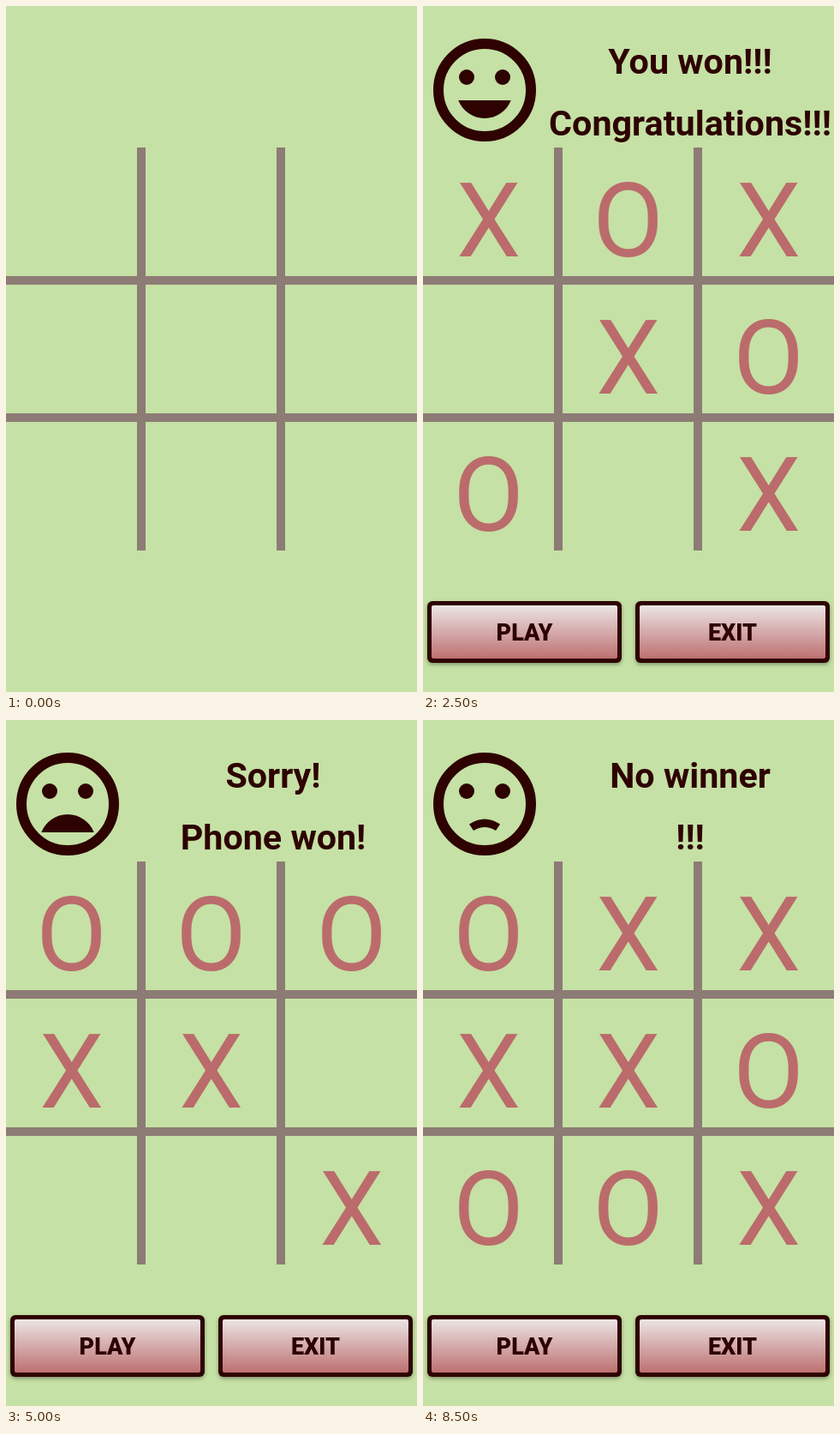
Recreate the animation shown at these times as an HTML page with a canvas. Size 480x800 px, loop 9000 ms.

```html
<!DOCTYPE html>
<html lang="en">
<head>
<meta charset="utf-8">
<title>Noughts and crosses</title>
<style>
html, body { margin: 0; width: 100%; height: 100%; overflow: hidden; background: #c5e1a5; }
canvas { display: block; }
</style>
</head>
<body>
<canvas id="stage" width="480" height="800"></canvas>
<script>
const ctx = document.getElementById('stage').getContext('2d');
const STEP = 500;
const GREEN = '#c5e1a5', LINE = '#8d7b75', MARK = '#bb6b6b', DARK = '#2e0201';
const COLUMNS = [76.5, 239.5, 403.5];

// Cells in order of play, X first; each step adds one X and the O that answers it.
const games = [
  { moves: '2586014', face: 'happy', lines: ['You won!!!', 'Congratulations!!!'] },
  { moves: '814032', face: 'sad', lines: ['Sorry!', 'Phone won!'] },
  { moves: '204635178', face: 'unsure', lines: ['No winner', '!!!'] }
];
for (const game of games) game.steps = Math.ceil(game.moves.length / 2) + 2;
const total = games.reduce((sum, game) => sum + game.steps, 0);

const mouths = {
  happy: new Path2D('M72 131C86 131 97.9 122.2 102.7 110H41.3C46.1 122.2 58 131 72 131Z'),
  sad: new Path2D('M72 110C58 110 46.1 118.7 41.3 131H102.7C97.9 118.7 86 110 72 110Z'),
  unsure: new Path2D('M54 121.5Q72 109.5 90 121.5L85 129Q72 121 59 129Z')
};

function text(str, x, y, font, color) {
  ctx.font = font + ' Roboto, sans-serif';
  ctx.textAlign = 'center';
  ctx.fillStyle = color;
  ctx.fillText(str, x, y);
}

function disc(x, y, r) {
  ctx.beginPath();
  ctx.arc(x, y, r, 0, Math.PI * 2);
}

function drawGrid() {
  ctx.fillStyle = LINE;
  for (const x of [153, 316]) ctx.fillRect(x, 165, 10, 470);
  for (const y of [315, 475]) ctx.fillRect(0, y, 480, 10);
}

function drawMarks(moves) {
  [...moves].forEach((cell, i) => {
    const row = Math.floor(cell / 3);
    text(i % 2 ? 'O' : 'X', COLUMNS[cell % 3], 292 + row * 160, '120px', MARK);
  });
}

function drawFace(mood) {
  disc(72, 98, 54);
  ctx.lineWidth = 12;
  ctx.strokeStyle = DARK;
  ctx.stroke();
  ctx.fillStyle = DARK;
  for (const x of [51, 93]) {
    disc(x, 83, 9);
    ctx.fill();
  }
  ctx.fill(mouths[mood]);
}

function drawButton(x, label) {
  ctx.save();
  ctx.shadowColor = 'rgba(0, 0, 0, 0.35)';
  ctx.shadowBlur = 4;
  ctx.shadowOffsetY = 2;
  ctx.fillStyle = DARK;
  ctx.beginPath();
  ctx.roundRect(x, 694, 227, 72, 6);
  ctx.fill();
  ctx.restore();

  const fade = ctx.createLinearGradient(0, 696, 0, 764);
  fade.addColorStop(0, '#eeeaea');
  fade.addColorStop(1, MARK);
  ctx.fillStyle = fade;
  ctx.beginPath();
  ctx.roundRect(x + 5, 699, 217, 62, 2);
  ctx.fill();
  text(label, x + 113.5, 740, '900 27px', DARK);
}

function drawResult(game) {
  drawFace(game.face);
  game.lines.forEach((line, i) => text(line, 312, 78.5 + i * 72, 'bold 41.25px', DARK));
  drawButton(5, 'PLAY');
  drawButton(248, 'EXIT');
}

function draw(time) {
  let step = Math.floor(time / STEP) % total;
  let n = 0;
  while (step >= games[n].steps) step -= games[n++].steps;
  const game = games[n];

  ctx.fillStyle = GREEN;
  ctx.fillRect(0, 0, 480, 800);
  drawGrid();
  drawMarks(game.moves.slice(0, step * 2));
  if (step === game.steps - 1) drawResult(game);
}

const start = performance.now();
function tick() {
  draw(performance.now() - start);
  requestAnimationFrame(tick);
}
tick();
</script>
</body>
</html>
```
